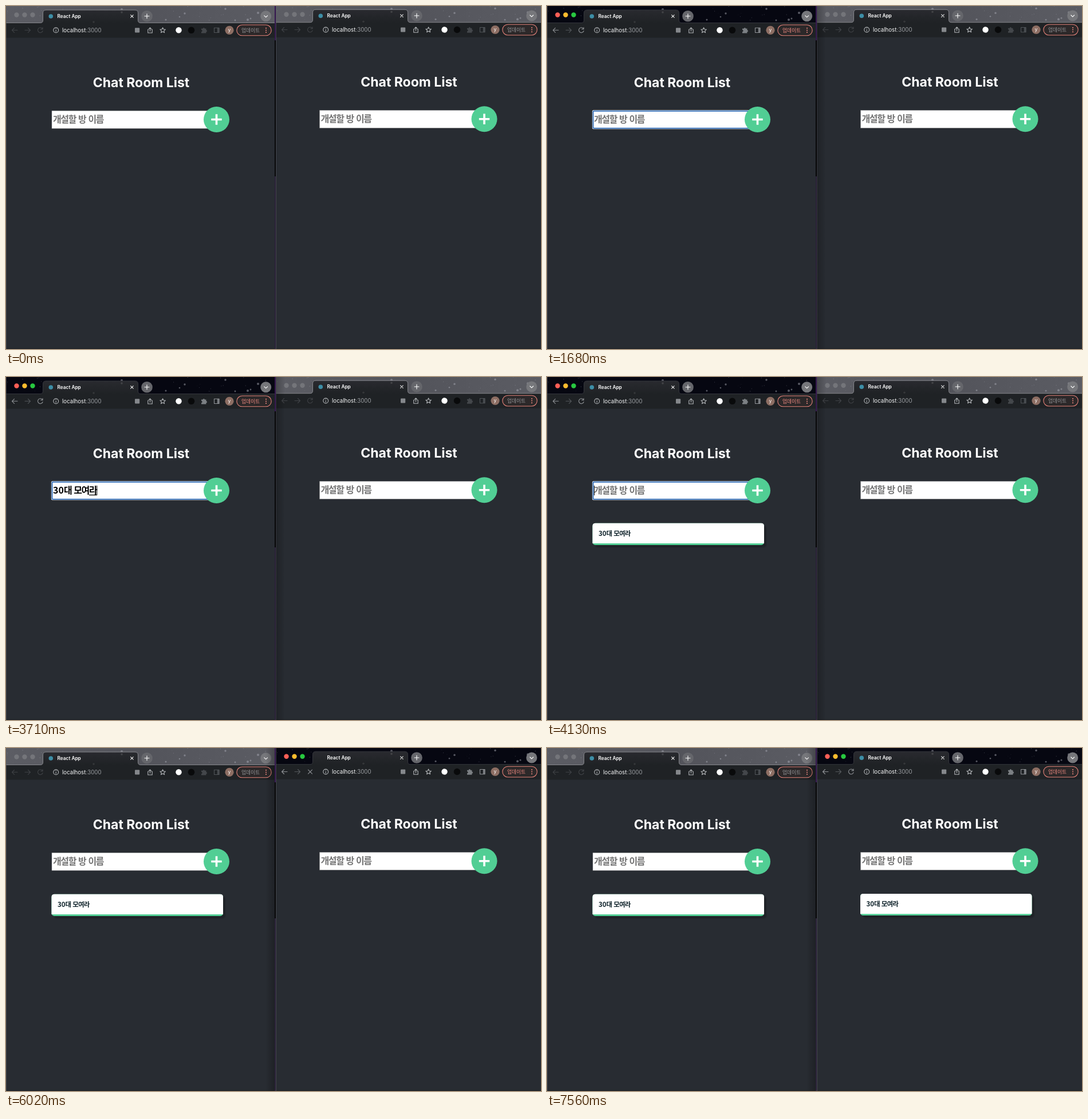
Recreate the animation shown at these times as an HTML page. Size 934 by 600 pixels, loop 7.63 s.

```html
<!DOCTYPE html>
<html lang="ko">
<head>
<meta charset="utf-8">
<title>Chat Room List</title>
<style>
  html, body { margin: 0; width: 100%; height: 100%; overflow: hidden; background: #282c32; }
  svg { display: block; }
  text { font-family: Inter, Roboto, sans-serif; white-space: pre; }
  .ko, .ko tspan { font-family: "Noto Sans CJK KR", "Noto Sans CJK", "Noto Sans CJK JP", sans-serif; }
  .big { font-size: 16px; font-weight: 700; letter-spacing: -1.4px; word-spacing: 1px; }
  .small { font-size: 11.5px; font-weight: 700; letter-spacing: -.9px; word-spacing: .7px; }
  .digits { letter-spacing: 0; }
  .line { fill: none; stroke-linecap: round; stroke-linejoin: round; stroke-width: 1.1; }

  .strip { fill: url(#inactiveStrip); }
  .edge { stroke: #85868b; }
  .nav, .forward { stroke: #404347; }
  .light { fill: #74757a; }
  .puzzle { fill: #44474b; }
  .panel { stroke: #505458; }
  .update { fill: #97999c; }
  .active .strip { fill: #060711; }
  .active .edge { stroke: #34363c; }
  .active .nav { stroke: #8f9296; }
  .active .forward { stroke: #54585c; }
  .active .puzzle { fill: #7c8084; }
  .active .panel { stroke: #8f9296; }
  .active .update { fill: #f28b82; }
  .active .light:nth-child(1) { fill: #ff5f57; }
  .active .light:nth-child(2) { fill: #febc2e; }
  .active .light:nth-child(3) { fill: #28c840; }
</style>
</head>
<body>
<svg id="stage" width="934" height="600" viewBox="0 0 934 600"></svg>
<script>
const LOOP = 7630;
const GREEN = '#51ce94';
const stage = document.getElementById('stage');

const circle = (x, y, r, fill, extra = '') => `<circle cx="${x}" cy="${y}" r="${r}" fill="${fill}" ${extra}/>`;
const rect = (x, y, w, h, fill, extra = '') => `<rect x="${x}" y="${y}" width="${w}" height="${h}" fill="${fill}" ${extra}/>`;
const line = (d, cls = '', color = '') => `<path class="line ${cls}" d="${d}" ${color && `stroke="${color}"`}/>`;
const mixed = s => s.replace(/\d+/g, '<tspan class="digits">$&</tspan>');

function starField() {
  const bright = [[202, 6, 2], [279, 24, 1.5], [303, 19, 1.3], [312, 13, 1.7], [383, 5, 1.7],
    [400, 25, 1.4], [422, 24, 2], [440, 12, 2], [427, 22, 1.4], [182, 31, 2]];
  let seed = 17;
  const random = () => (seed = seed * 16807 % 2147483647) / 2147483647;
  const faint = Array.from({ length: 40 }, () => [random() * 470, random() * 29, .3 + random() * .4]);
  return bright.map(([x, y, r]) => circle(x, y, r, '#a9abb5', 'opacity=".5"')).join('') +
    faint.map(([x, y, r]) => circle(x.toFixed(1), y.toFixed(1), r.toFixed(2), '#c5c8d4', 'opacity=".3"')).join('');
}

function tabStrip(w) {
  const tab = 'Q64.5 29.5 64.5 25V12Q64.5 7 70 7H225Q230.5 7 230.5 12V25Q230.5 29.5 235 29.5';
  return `<rect class="strip" y="-1" width="${w}" height="31"/>` + starField() +
    rect(0, 29.5, w, 26, '#1f2225') +
    `<path d="M60 30${tab}V30Z" fill="url(#tabFill)"/>` +
    circle(202, 11, 1.8, '#777', 'opacity=".35"') +
    circle(153, 28, 1.8, '#777', 'opacity=".25"') +
    `<path class="edge" d="M0 29.5H60${tab}H${w}" fill="none" stroke-width="1"/>` +
    `<g>${[18.5, 32.5, 46.5].map(x => `<circle class="light" cx="${x}" cy="15.5" r="4.2"/>`).join('')}</g>` +
    circle(78.3, 18, 3.8, '#3d8ea6', 'class="favicon"') +
    '<text x="89.5" y="20.8" font-size="8.3" font-weight="600" fill="#fff">React App</text>' +
    line('M217.6 15.6l4.6 4.6m0-4.6l-4.6 4.6', '', '#eee') +
    circle(246, 17.8, 9.8, '#65666b') +
    line('M242 17.8h8m-4-4v8', '', '#fff');
}

function toolbarLeft() {
  return line('M20 42.3H10.5m4-4l-4 4l4 4', 'nav') +
    line('M33 42.3h9.5m-4-4l4 4l-4 4', 'forward') +
    `<g class="reload">${line('M63.4 39.5a4.4 4.4 0 1 0 .7 4M64 37.5v3h-3.2', 'nav')}</g>` +
    `<g class="stop">${line('M56.5 39l7 7m0-7l-7 7', 'nav')}</g>` +
    line('M91.6 42.3a4.4 4.4 0 1 1-8.8 0a4.4 4.4 0 1 1 8.8 0M87.2 42v2.4M87.2 39.9v.1', '', '#b4b7ba') +
    '<text x="98" y="45.7" font-size="9.7" fill="#f4f5f6">localhost<tspan fill="#9a9da1">:3000</tspan></text>';
}

function toolbarRight() {
  return rect(225, 38.2, 8.2, 8.2, '#85888c', 'rx="1"') +
    line('M249 41h-1.2v6h7.4v-6H254M251.5 44v-6.2m-2 2l2-2l2 2', '', '#b4b7ba') +
    line('M273.6 37.7l1.4 3.1l3.3.3l-2.5 2.2l.8 3.3l-3-1.8l-3 1.8l.8-3.3l-2.5-2.2l3.3-.3z', '', '#b4b7ba') +
    circle(301.5, 42.3, 5.2, '#fff') +
    circle(323.5, 42.3, 5.8, '#090a0b') +
    '<path class="puzzle" d="M341 39.5h2.7a1.6 1.6 0 1 1 3.2 0h2.5v2.6a1.6 1.6 0 1 1 0 3.2v2.2h-8.4v-2.5a1.6 1.6 0 1 0 0-3.2z"/>' +
    line('M363.5 38.3h8.5v8.2h-8.5zM369.5 38.5v8M371 38.5v8', 'panel') +
    circle(390, 42.3, 7.6, '#8d6e63') +
    '<text x="390" y="45" font-size="8.5" text-anchor="middle" fill="#fff">y</text>' +
    rect(402.8, 33, 60.4, 18.8, '#2c2829', 'rx="9.4" stroke="#e5827a" stroke-width="1.1"') +
    '<text class="ko update" x="411" y="45.6" font-size="8.7">업데이트</text>' +
    [38.8, 42.4, 46].map(y => circle(454, y, 1, '#f28b82')).join('') +
    circle(453.7, 17.8, 9.5, '#76777b') +
    line('M450.8 16.8l2.9 2.8l2.9-2.8', '', '#fff');
}

function page() {
  return '<text x="236" y="142" font-size="23" font-weight="700" text-anchor="middle" fill="#fff">Chat Room List</text>' +
    rect(80, 183.2, 288, 31, '#fff', 'stroke="#85878a" stroke-width=".5"') +
    `<g class="ring">${rect(79.4, 182.5, 290, 32.4, '#fff', 'rx="1.5" stroke="#dfe7f2" stroke-width=".8"')}` +
    `${rect(80.6, 183.7, 287, 30, '#fff', 'rx="1" stroke="#1559ad" stroke-width="1.5"')}</g>` +
    '<text class="ko big hint" x="82" y="203.6" fill="#757575">개설할 방 이름</text>' +
    '<text class="ko big typed" x="82" y="203.6" fill="#000"></text>' +
    '<rect class="underline" y="205.8" height="1.3"/>' +
    '<rect class="caret" y="190" width="1" height="17"/>' +
    circle(367.5, 198.5, 22.5, GREEN) +
    '<path d="M358.3 198.5h18.4M367.5 189.3v18.4" stroke="#fff" stroke-width="3.6"/>' +
    '<g class="room">' +
    rect(84, 260, 299, 38, '#000', 'rx="5" opacity=".22" filter="url(#soft)"') +
    rect(79.5, 255.7, 299.5, 38.2, GREEN, 'rx="5"') +
    '<path class="card" d="M79.5 291V260.7q0-5 5-5H374q5 0 5 5V291z"/>' +
    `<text class="ko small" x="90" y="277.8" fill="#0c2028">${mixed('30대 모여라')}</text></g>`;
}

function browser(id, x, w, dy, barShift, pageShift) {
  return `<svg id="${id}" x="${x}" width="${w}" height="600">` +
    rect(0, 0, w, 600, '#282c32') +
    `<g transform="translate(0 ${dy})">${tabStrip(w)}${toolbarLeft()}` +
    `<g transform="translate(${barShift})">${toolbarRight()}</g>` +
    `<g transform="translate(${pageShift})">${page()}</g></g>` +
    rect(0, 598.5, w, 1.5, '#1f2226') +
    rect(0, 0, .6, 600, '#55585e') + '</svg>';
}

stage.innerHTML = `<defs>
  <linearGradient id="inactiveStrip"><stop stop-color="#5c5d64"/><stop offset=".5" stop-color="#53545b"/><stop offset="1" stop-color="#5b5c63"/></linearGradient>
  <linearGradient id="tabFill" x2="0" y2="1"><stop stop-color="#292a2f"/><stop offset="1" stop-color="#1f2225"/></linearGradient>
  <linearGradient id="shade"><stop stop-color="#000" stop-opacity=".24"/><stop offset="1" stop-color="#000" stop-opacity="0"/></linearGradient>
  <filter id="soft"><feGaussianBlur stdDeviation="1.2"/></filter></defs>` +
  rect(0, 0, 934, 600, '#2a2138') + rect(469, 0, 2, 60, '#35164f') + rect(469, 60, 2, 238, '#050506') +
  browser('left', 0, 469, 0, 0, 0) +
  browser('right', 471, 463, -.8, -7, -3.5) +
  rect(471, 0, 16, 600, 'url(#shade)', 'id="shadeRight"') +
  rect(453, 0, 16, 600, 'url(#shade)', 'id="shadeLeft" transform="rotate(180 461 300)"');

// Each entry: start time, committed text, syllable still being composed.
const typing = [
  [0, '', ''], [1820, '3', ''], [1960, '30', ''], [2450, '30', 'ㄷ'], [2590, '30', '대'],
  [2730, '30대 ', ''], [2870, '30대 ', 'ㅁ'], [2940, '30대 ', '모'], [3080, '30대 ', '몽'],
  [3220, '30대 모', '여'], [3430, '30대 모', '열'], [3570, '30대 모여', '라'], [3990, '', '']
];
const within = (t, from, to) => t >= from && t < to;
const part = (win, cls) => stage.querySelector(`#${win} .${cls}`);
const show = (el, on) => el.setAttribute('visibility', on ? 'visible' : 'hidden');

const ui = {};
for (const win of ['left', 'right']) {
  ui[win] = { root: document.getElementById(win) };
  for (const cls of ['favicon', 'reload', 'stop', 'ring', 'hint', 'typed', 'underline', 'caret', 'room', 'card'])
    ui[win][cls] = part(win, cls);
}
const shadeLeft = document.getElementById('shadeLeft');
const shadeRight = document.getElementById('shadeRight');

function setWindow(w, s) {
  w.root.setAttribute('class', s.active ? 'active' : '');
  show(w.favicon, !s.loading);
  show(w.reload, !s.loading);
  show(w.stop, s.loading);
  show(w.ring, s.focused);
  show(w.room, s.room);
  w.card.setAttribute('fill', s.hover ? GREEN : '#fff');

  const text = s.done + s.composing;
  if (w.text !== text) {
    w.text = text;
    w.typed.innerHTML = mixed(text);
    w.end = 82 + (text ? w.typed.getComputedTextLength() : 0);
  }
  show(w.hint, !text);
  show(w.underline, s.composing);
  w.underline.setAttribute('x', w.end - 13.3);
  w.underline.setAttribute('width', 13);
  show(w.caret, s.caret);
  w.caret.setAttribute('x', w.end);
}

function render(t) {
  const [, done, composing] = typing.findLast(([start]) => t >= start);
  const leftActive = within(t, 420, 5250);
  const rightActive = t >= 5250;
  setWindow(ui.left, {
    active: leftActive,
    focused: within(t, 840, 5250),
    caret: within(t, 840, 1400) || within(t, 1820, 4480) || within(t, 5040, 5250),
    room: t >= 3990,
    done, composing
  });
  setWindow(ui.right, {
    active: rightActive,
    loading: within(t, 6020, 6160),
    room: t >= 6230,
    hover: within(t, 6510, 7070),
    done: '', composing: ''
  });
  show(shadeRight, leftActive);
  show(shadeLeft, rightActive);
}

const begin = performance.now();
function tick() {
  render((performance.now() - begin) % LOOP);
  requestAnimationFrame(tick);
}
tick();
</script>
</body>
</html>
```
